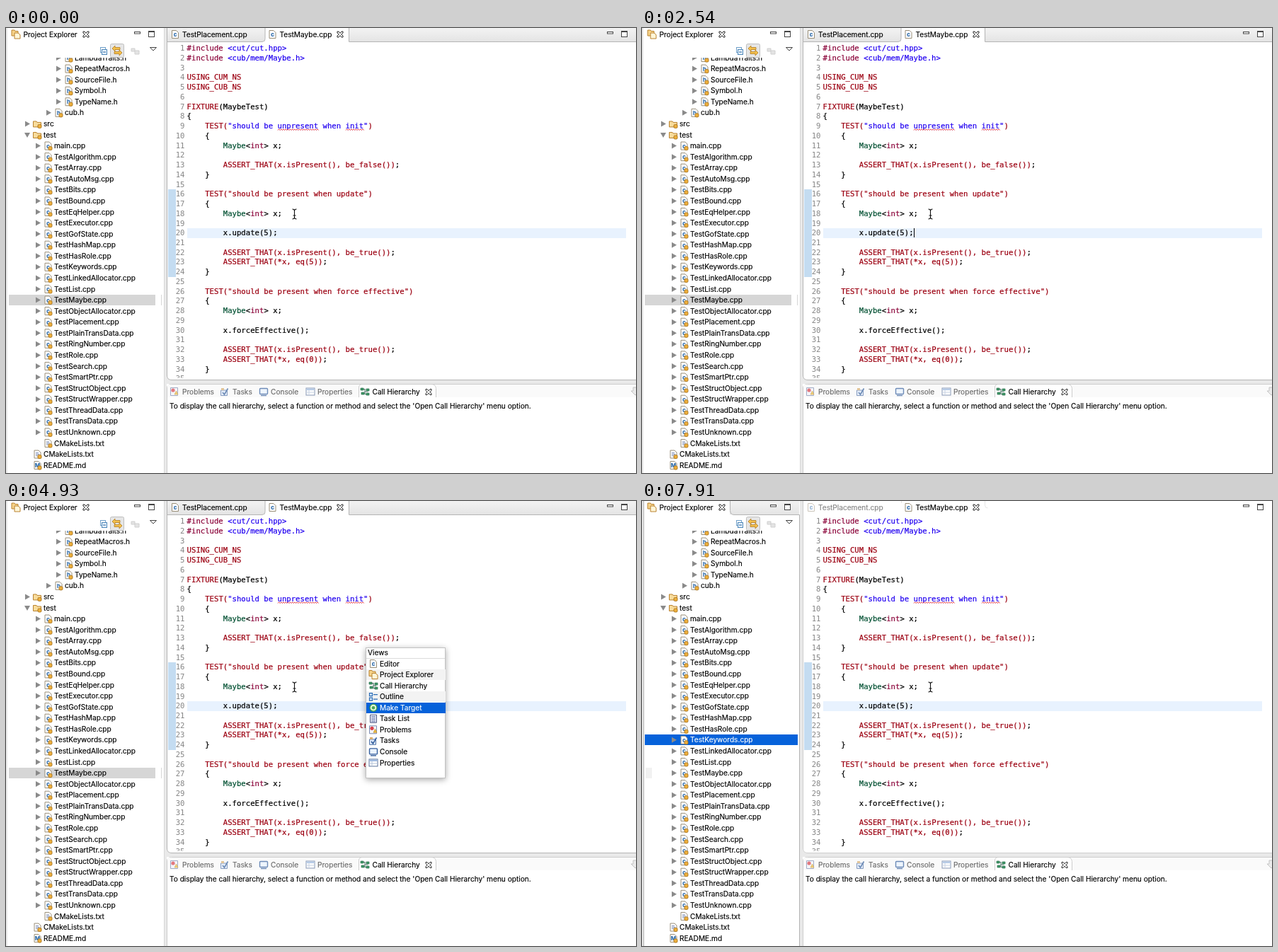
Animation, 890 px wide and 629 px high, one loop 8 s. Source, as an HTML page:

```html
<!DOCTYPE html>
<html lang="en">
<head>
<meta charset="utf-8">
<title>Switching views</title>
<style>
  html, body { margin: 0; width: 100%; height: 100%; overflow: hidden; background: #fff; }
  svg { display: block; width: 890px; height: 629px; }
  text { font: 10.15px Inter, "Open Sans", sans-serif; color: #000; fill: currentColor; stroke: currentColor; stroke-width: .15; white-space: pre; }
  .code { font: 10.64px "DejaVu Sans Mono", "Liberation Mono", monospace; stroke-width: .22; }
  tspan { fill: currentColor; stroke: currentColor; }
  .num { color: #858585; text-anchor: end; stroke: none; }
  .r { color: #9c0012; }
  .b { color: #2200f0; }
  .g { color: #005032; }
  .k { color: #8a0038; }
  .n { color: #000; }
  .dim { color: #6a6a6a; }
  .pale { color: #858585; }
  .glyph { font-size: 8px; font-weight: 700; color: #2868a8; text-anchor: middle; }
  .sel text:not(.glyph) { color: #fff; }
  .sel .bar { fill: #0662da; }
  .line { fill: none; stroke: #cdcdcd; }
  .dark { stroke: #b4b4b4; }
  .step { animation: 8s step-end infinite; }
</style>
</head>
<body>
<script>
const LOOP = 8000, CHAR = 6.405;
const lineY = n => 28.6 + 13.74 * (n - 1);
const rowY = i => 42 + 15.57 * i;
const itemY = i => 230 + 15.55 * i;
const rules = [];

// Registers a stepped animation and returns the attributes that run it.
function steps(prop, list) {
  const name = 'a' + rules.length;
  const frames = list.map(([t, v]) => `${t / LOOP * 100}%{${prop}:${v}}`);
  rules.push(`@keyframes ${name}{${frames.join('')}}`);
  return `class="step" style="animation-name:${name}"`;
}

// Hidden at first, then toggled at each of the given times.
const shown = (...times) => {
  const list = times.map((t, i) => [t, i % 2 ? 'hidden' : 'visible']);
  return steps('visibility', times[0] ? [[0, 'hidden'], ...list] : list);
};

const esc = s => s.replace(/&/g, '&amp;').replace(/</g, '&lt;');
const text = (x, y, s, cls = '') => `<text x="${x}" y="${y + 3.6}" class="${cls}">${esc(s)}</text>`;
const rect = (x, y, w, h, fill, extra = '') =>
  `<rect x="${x}" y="${y}" width="${w}" height="${h}" fill="${fill}" ${extra}/>`;
const path = (d, cls = 'line', extra = '') => `<path d="${d}" class="${cls}" ${extra}/>`;
const shape = (d, fill, stroke = 'none', w = 1) =>
  `<path d="${d}" fill="${fill}" stroke="${stroke}" stroke-width="${w}"/>`;
const group = (attrs, ...parts) => `<g ${attrs}>${parts.join('')}</g>`;

const badge = rect(0.5, 1, 5, 5, '#eeb03c', 'rx="1.5" stroke="#a8721c" stroke-width=".9"');
const sheet = shape('M-4.5-5.5h6l3 3v8h-9z', '#fdfdff', '#9a8f78');
const letter = c => `<text class="glyph" y="3">${c}</text>`;
const folder = shape('M-6 4.5v-8h4.5l1 1.5h5.5v6.5z', '#f8dc9c', '#b9822f');
const icons = {
  c: sheet + letter('c') + badge,
  h: sheet + letter('h') + badge,
  editor: sheet + letter('c'),
  txt: sheet + shape('M-2.5-2h4M-2.5 0h5M-2.5 2h4', 'none', '#7d8fb5') + badge,
  md: sheet + letter('M') + badge,
  folder: folder + badge,
  explorer: shape('M-6 2v-8h4l1 1.5h4v6.5z', '#f6d38a', '#b9822f') + shape('M-2-2h5l3 2.5v5.5h-8z', '#fff6d8', '#b9822f'),
  calls: shape('M-4-3.5h4v7h4M0 0h4', 'none', '#5c7c74', 1.2) +
    shape('M-6-5h4v3h-4zM2-4h4v3h-4zM-5 1h4v3h-4zM2 2h4v3h-4z', '#3f9a68', '#2b6f50', .7),
  outline: shape('M-5.5-5h4v4h-4zM-5.5 1.5h4v4h-4z', '#dcecff', '#2b6cb5', 1.2) + shape('M0-3h6M0 3.5h6', 'none', '#2b6cb5', 1.4),
  make: '<circle r="5" fill="#e2f5d8" stroke="#3d9b4c" stroke-width="1.3"/><circle r="2.3" fill="#4aa657"/>',
  list: shape('M-4.5-5.5h9v11h-9z', '#f2f4ff', '#4b5680') + shape('M-3-3h6M-3-.7h6M-3 1.6h6M-3 4h6', 'none', '#5b6ca0'),
  problems: shape('M-5.5-5.5h10v11h-10z', '#f3f5fb', '#7c8bb0') +
    '<circle cx="-2" cy="-2" r="2.6" fill="#d8404a"/>' + shape('M0 4l2.5-5 2.5 5z', '#efbd3e', '#b98a20', .6),
  tasks: shape('M-5.5-2h9v7.5h-9z', '#dfe9fa', '#5475a8') + shape('M-3 1l2.5 3 5-8.5', 'none', '#35609c', 1.7) +
    rect(-5, -5, 4, 3, '#d9b071'),
  console: rect(-5.5, -4.5, 11, 8, '#eaf3ff', 'rx="1" stroke="#345e9d" stroke-width="1.4"') + shape('M-4 5.5h8', 'none', '#345e9d', 1.4),
  table: rect(-6, -5, 12, 10, '#fff', 'stroke="#5a7199"') + rect(-5.5, -4.5, 11, 2.5, '#9db9df') + shape('M-2-2v7M-6 1h12', 'none', '#b4c3d9')
};
const icon = (name, x, y, extra = '') => `<g transform="translate(${x} ${y})" ${extra}>${icons[name]}</g>`;
const cross = (x, y) =>
  shape(`M${x - 4} ${y - 4}h2l2 2.4 2-2.4h2v2l-2.4 2 2.4 2v2h-2l-2-2.4-2 2.4h-2v-2l2.4-2-2.4-2z`, '#fff', '#222', 1);
const minMax = x => rect(x + .5, 5.5, 8, 2.5, '#fff', 'stroke="#444"') +
  rect(x + 20.5, 4.5, 8, 8, '#fff', 'stroke="#444"') + rect(x + 20, 4, 9, 2, '#444');

// Project tree: text x, icon, arrow (1 closed, 2 open), label.
const tests = ('Algorithm Array AutoMsg Bits Bound EqHelper Executor GofState HashMap HasRole Keywords ' +
  'LinkedAllocator List Maybe ObjectAllocator Placement PlainTransData RingNumber Role Search SmartPtr ' +
  'StructObject StructWrapper ThreadData TransData Unknown').split(' ');
const tree = [
  ...['LambdaTraits', 'RepeatMacros', 'SourceFile', 'Symbol', 'TypeName'].map(s => [97, 'h', 1, s + '.h']),
  [83, 'h', 1, 'cub.h'], [53, 'folder', 1, 'src'], [53, 'folder', 2, 'test'], [68, 'c', 1, 'main.cpp'],
  ...tests.map(s => [68, 'c', 1, `Test${s}.cpp`]),
  [68, 'txt', 0, 'CMakeLists.txt'], [53, 'txt', 0, 'CMakeLists.txt'], [53, 'md', 0, 'README.md']
];
const arrows = ['', 'm-3-4 7 4-7 4z', 'm-4-3h8l-4 7z'];

function treeRow(i) {
  const [x, kind, arrow, label] = tree[i], y = rowY(i);
  return (arrow ? shape(`M${x - 23} ${y}${arrows[arrow]}`, '#8a8a8a') : '') + icon(kind, x - 8.5, y) + text(x, y, label);
}
const treeSel = (i, ...times) => group(shown(...times),
  group('class="sel"', rect(4, Math.round(rowY(i) - 7.5), 216, 15, '', 'class="bar"'), treeRow(i)));

// Code: "~" plus a letter starts a coloured run.
const test = s => `    ~rTEST("${s}")`, decl = '        ~gMaybe~n<~kint~n> x;';
const must = s => `        ~rASSERT_THAT(${s})~n;`;
const code = [
  '~k#include ~b<cut/cut.hpp>', '~k#include ~b<cub/mem/Maybe.h>', '', '~rUSING_CUM_NS', '~rUSING_CUB_NS', '',
  '~rFIXTURE~n(MaybeTest)', '{',
  '    ~rTEST(~b"should be unpresent when init"~r)', '    {', decl, '', must('x.isPresent(), be_false()'), '    }', '',
  test('should be present when update'), '    {', decl, '', '        x.update(5);', '',
  must('x.isPresent(), be_true()'), must('*x, eq(5)'), '    }', '',
  test('should be present when force effective'), '    {', decl, '', '        x.forceEffective();', '',
  must('x.isPresent(), be_true()'), must('*x, eq(0)'), '    }', ''
];
function codeLine(s, i) {
  const y = lineY(i + 1) + 3.6;
  const [plain, ...runs] = s.split('~');
  const spans = runs.map(r => `<tspan class="${r[0]}">${esc(r.slice(1))}</tspan>`).join('');
  return `<text class="code num" x="252.5" y="${y}">${i + 1}</text>` +
    `<text class="code" x="255.6" y="${y}">${esc(plain)}${spans}</text>`;
}
const squiggle = (x, n) => shape(`M${x} 144.5` + 'l1.6-1.6 1.6 1.6'.repeat(n * 2), 'none', '#dc2030', .9);

// Time, line and column of the text cursor.
const moves = [[0, 20, 20], [300, 19, 0], [750, 18, 21], [2390, 19, 0], [2540, 20, 20]];
const barMoves = moves.map(([t, n]) => [t, `translateY(${Math.round(lineY(n) - 6.9)}px)`]);
const caretMoves = moves.map(([t, n, col]) => [t, `translate(${Math.round(256 + col * CHAR)}px,${Math.round(lineY(n) - 6.5)}px)`]);

// View switcher
const views = [['editor', 'Editor'], ['explorer', 'Project Explorer'], ['calls', 'Call Hierarchy'], ['outline', 'Outline'],
  ['make', 'Make Target'], ['list', 'Task List'], ['problems', 'Problems'], ['tasks', 'Tasks'], ['console', 'Console'],
  ['table', 'Properties']];
const viewRow = i => icon(views[i][0], 519, itemY(i)) + text(528, itemY(i), views[i][1]);
const viewBar = (i, fill) => rect(509, Math.round(itemY(i) - 7.5), 112, 15, fill, 'class="bar"');
const viewSel = (i, ...times) => group(shown(...times), group('class="sel"', viewBar(i, ''), viewRow(i)));

const bottomTabs = [['problems', 238, 249, 'Problems'], ['tasks', 309, 320, 'Tasks'],
  ['console', 364, 374, 'Console'], ['table', 430, 440, 'Properties']];

const explorer = [
  rect(2, 0, 221, 629, '#fff'),
  group(shown(0, 6710), path('M223.5 0V629', 'line', 'opacity=".6"'), rect(4, 377, 207, 15, '#d6d6d6'), rect(219, 377, 1, 15, '#d6d6d6')),
  group(shown(6710), rect(124, 0, 98, 19, 'url(#tabs)'), path('M2.5 0V629M222.5 629V19.5H130q-5 0-5.5-6V0', 'line dark')),
  group(shown(7460), rect(5, 377, 9, 15, '#f1f1f1')),
  icon('explorer', 14, 9), text(24.5, 9, 'Project Explorer'), cross(113, 9), minMax(181),
  rect(133.5, 27.5, 7, 7, '#fff', 'stroke="#6f9fc8"'), rect(135.5, 30.5, 7, 7, '#e8f4ff', 'stroke="#4c85b8"'),
  shape('M137 34h4', 'none', '#285f96'),
  rect(147.5, 22.5, 19, 19, '#e6e6e6', 'rx="2" stroke="#bdbdbd"'),
  shape('M150 29l4-4v2.5h7v3h-7v2.5zM164 35l-4-4v2.5h-7v3h7v2.5z', '#f3c04c', '#b17c22', .8),
  shape('M177 29h5v4h-5zM182 32h6v5h-6z', '#e4e4e4', '#cfcfcf'),
  shape('M203.5 27.5h9l-4.5 4.5z', '#fff', '#444'),
  group('clip-path="url(#treeClip)"', ...tree.map((_, i) => treeRow(i))),
  treeSel(22, 6710, 7460), treeSel(21, 7460, 7910), treeSel(19, 7910)
];

const frame = 'M227.5 0V491q0 6.5 6.5 6.5H890';
const editor = [
  path('M227 0H890V498H234q-7 0-7-7z', '', 'fill="#fff"'),
  group(shown(0, 6710), rect(227, 0, 139, 19, 'url(#tabs)'), rect(485, 0, 405, 19, 'url(#tabs)'),
    path(frame + 'M227 19.5H361q5 0 5-5V0M484.5 0V19.5H890', 'line dark'),
    icon('editor', 239, 9), text(249, 9, 'TestPlacement.cpp')),
  group(shown(6710), path(frame), path('M366.5 0v3M484.5 0v6q0 4 4 4', 'line', 'opacity=".5"'),
    icon('editor', 239, 9, 'opacity=".5"'), text(249, 9, 'TestPlacement.cpp', 'pale')),
  icon('editor', 376.5, 9), text(386.5, 9, 'TestMaybe.cpp'), cross(472, 9), minMax(849),
  rect(229, 228, 11, 124, '#c4dcf1'),
  `<g ${steps('transform', barMoves)}>${rect(256, 0, 620, 14, '#e8f2fe')}</g>`,
  group('clip-path="url(#codeClip)"', ...code.map(codeLine)),
  squiggle(384, 9), squiggle(480, 4),
  `<g ${steps('transform', caretMoves)}><g ${shown(300, 450, 750, 1050, 1500, 2090, 2390, 2690, 3290, 3740)}>${rect(0, 0, 1, 13, '#000')}</g></g>`,
  shape('M404.5 256q3 0 3 2.5v9q0 2.5-3 2.5M410.5 256q-3 0-3 2.5v9q0 2.5 3 2.5M405.5 265h4', 'none', '#111', 1.1)
];

const lower = [
  rect(227, 503, 663, 126, '#fff'),
  path('M227.5 629V509q0-5.5 6-5.5H890'),
  rect(228, 504, 270, 18, '#fafafa'), rect(608, 504, 282, 18, '#fafafa'),
  path('M498.5 522V508q0-4.5 5-4.5H601q6 0 6.5 6V522'),
  ...bottomTabs.map(([kind, ix, x, s]) => icon(kind, ix, 514, 'opacity=".7"') + text(x, 514, s, 'dim')),
  icon('calls', 507, 514), text(517.5, 514, 'Call Hierarchy'), cross(597, 514.5),
  shape('M886 508h6v5h3l-6 6-6-6h3z', '#ececec', '#c4c4c4'),
  text(231, 534, "To display the call hierarchy, select a function or method and select the 'Open Call Hierarchy' menu option.")
];

const popup = [
  group(shown(4190, 6570), rect(508, 207, 113, 185, '#fff', 'filter="url(#shadow)"'),
    rect(508.5, 207.5, 112, 184, '#fff', 'stroke="#c2c2c2"')),
  group(shown(4340, 6570), text(511, 214.5, 'Views'), path('M509 222.5H620', 'line', 'opacity=".7"'),
    viewBar(1, '#f3f3f3'), viewBar(3, '#f3f3f3'), ...views.map((_, i) => viewRow(i))),
  viewSel(1, 4340, 4630, 6270, 6570), viewSel(2, 4630, 4780, 5970, 6270),
  viewSel(3, 4780, 4930, 5680, 5970), viewSel(4, 4930, 5680)
];

const defs = `<defs>
  <clipPath id="treeClip">${rect(0, 42, 223, 587, '#000')}</clipPath>
  <clipPath id="codeClip">${rect(227, 19, 663, 475.5, '#000')}</clipPath>
  <linearGradient id="tabs" x2="0" y2="1"><stop stop-color="#f3f3f3"/><stop offset="1" stop-color="#e4e4e4"/></linearGradient>
  <filter id="shadow" x="-20%" y="-20%" width="140%" height="140%">
    <feDropShadow dx="0" dy="2" stdDeviation="4" flood-opacity=".35"/></filter></defs>`;
const scene = [rect(0, 0, 890, 629, '#e9e9e9'), ...explorer, ...editor, ...lower, ...popup].join('');
document.head.insertAdjacentHTML('beforeend', `<style>${rules.join('')}</style>`);
document.body.innerHTML = `<svg viewBox="0 0 890 629">${defs}${scene}</svg>`;
</script>
</body>
</html>
```
